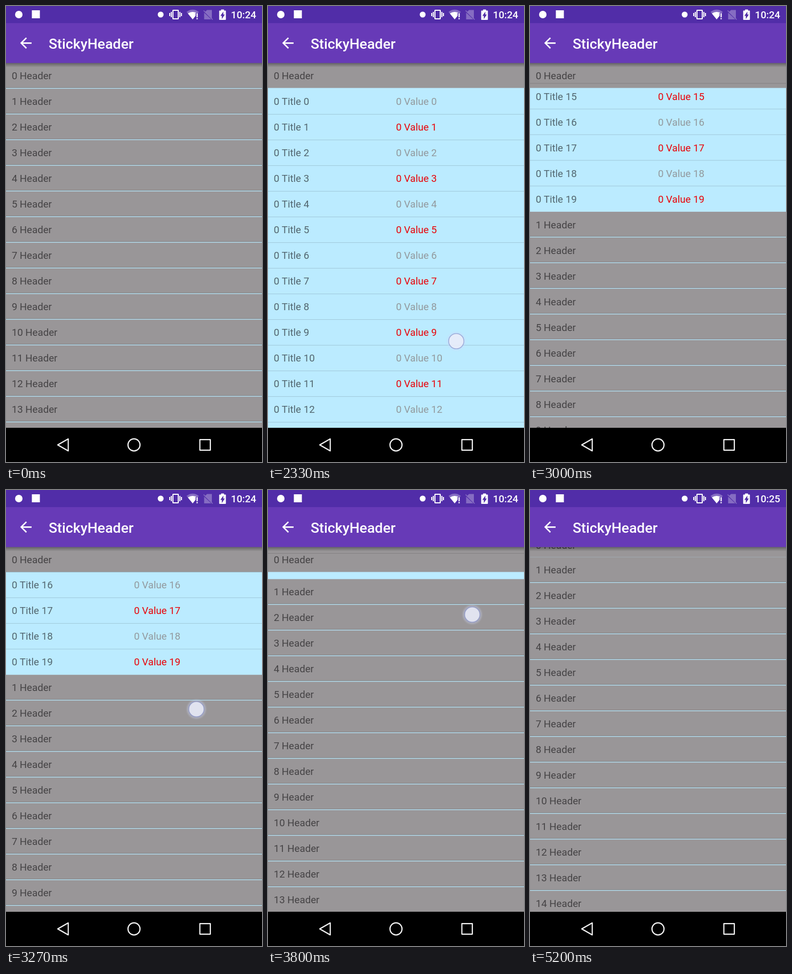
Write an HTML page with a canvas that moves like this. It is 480x853 px and loops after 5270 ms.

```html
<!DOCTYPE html>
<html lang="en">
<head>
<meta charset="utf-8">
<title>StickyHeader</title>
<style>
html, body { margin: 0; width: 100%; height: 100%; overflow: hidden; background: #000; }
canvas { display: block; width: 100vw; height: 100vh; }
</style>
</head>
<body>
<canvas id="stage" width="480" height="853"></canvas>
<script>
const ctx = document.getElementById('stage').getContext('2d');
const LOOP = 5270, STEP = 200 / 3;
// One dp is 4/3 px, so edges fall between pixels
const TOP = 106.67, ROW = 48, HEADER_H = 46.67, BASELINE = 30.7;
const CHILDREN = 20, NAV_Y = 789;
const BLUE = '#bbebff', GRAY = '#999698', PURPLE = '#673ab7', STATUS = '#512da8';

// Scroll keys: time, position, speed in px/ms
const KEYS = [
  [2333, 0, 0], [2667, 446.4, 1.45], [3267, 769, 0], [3800, 948, 0.18], [4400, 989, 0]
];

const clamp = (v, lo = 0, hi = 1) => Math.min(hi, Math.max(lo, v));
const ramp = (t, a, b) => clamp((t - a) / (b - a));

function scrollAt(t) {
  if (t <= KEYS[0][0]) return 0;
  for (let i = 1; i < KEYS.length; i++) {
    const [t0, p0, v0] = KEYS[i - 1], [t1, p1, v1] = KEYS[i];
    if (t > t1) continue;
    const h = t1 - t0, u = (t - t0) / h, w = 1 - u;
    return w * w * (1 + 2 * u) * p0 + u * u * (3 - 2 * u) * p1
      + h * u * w * (w * v0 - u * v1);
  }
  return KEYS[KEYS.length - 1][1];
}

function rect(x, y, w, h, color) {
  ctx.fillStyle = color;
  ctx.fillRect(x, y, w, h);
}

function text(str, x, y, color, font = '18.67px Roboto, sans-serif') {
  ctx.font = font;
  ctx.fillStyle = color;
  ctx.fillText(str, x, y);
}

function shape(d, color, x = 0, y = 0, scale = 1) {
  ctx.save();
  ctx.translate(x, y);
  ctx.scale(scale, scale);
  ctx.fillStyle = color;
  ctx.fill(new Path2D(d));
  ctx.restore();
}

function dot(x, y, r, color) {
  ctx.beginPath();
  ctx.arc(x, y, r, 0, Math.PI * 2);
  ctx.fillStyle = color;
  ctx.fill();
}

function header(n, y) {
  rect(0, y, 480, HEADER_H, GRAY);
  text(n + ' Header', 10.7, y + BASELINE, '#454345');
}

function child(n, y, alpha) {
  ctx.globalAlpha = alpha;
  text('0 Title ' + n, 10.7, y + BASELINE, '#52666f');
  text('0 Value ' + n, 240, y + BASELINE, n % 2 ? '#e90309' : '#92999d');
  ctx.globalAlpha = 1;
}

function list(t) {
  const open = t >= 790, scroll = scrollAt(t);
  const fade = ramp(t, 1070, 1267);
  const rowY = i => TOP + i * ROW - scroll;
  const visible = y => y > TOP - ROW && y < NAV_Y;
  const count = open ? CHILDREN : 0;

  ctx.save();
  ctx.beginPath();
  ctx.rect(0, 106, 480, NAV_Y - 106);
  ctx.clip();
  rect(0, 106, 480, NAV_Y - 106, BLUE);
  for (let i = 0; i < count; i++) {
    if (visible(rowY(i + 1))) child(i, rowY(i + 1), fade);
  }
  for (let n = open ? 1 : 0; n < 16; n++) {
    const y = rowY(count + n);
    if (!visible(y)) continue;
    header(n, y);
    rect(0, y + HEADER_H - 0.9, 480, 0.9, 'rgba(0,0,0,.2)');
  }
  if (open) header(0, Math.min(TOP, rowY(count + 1) - HEADER_H));
  // Row dividers lie above the sticky header
  for (let i = 0; i < count - 1; i++) {
    rect(0, rowY(i + 1) + 47.4, 480, 1, 'rgba(0,0,0,.15)');
  }
  ctx.restore();
}

function touch(x, y, alpha) {
  if (alpha <= 0) return;
  ctx.save();
  ctx.globalAlpha = alpha;
  const glow = ctx.createRadialGradient(x, y, 13, x, y, 20);
  glow.addColorStop(0, 'rgba(205,215,250,.55)');
  glow.addColorStop(1, 'rgba(205,215,250,0)');
  dot(x, y, 20, glow);
  dot(x, y, 14, 'rgba(238,240,248,.77)');
  ctx.lineWidth = 1.5;
  ctx.strokeStyle = 'rgba(125,135,195,.6)';
  ctx.beginPath();
  ctx.arc(x, y, 14.3, 0, Math.PI * 2);
  ctx.stroke();
  ctx.restore();
}

function touches(t) {
  const s = scrollAt(t);
  if (t >= 660 && t < 1000) touch(363, 144, 1 - ramp(t, 870, 1000));
  if (t >= 2330 && t < 2740) {
    const d = Math.min(386, s);
    touch(353 + 43 * d / 386, 627 - d, 1 - ramp(t, 2590, 2730));
  }
  if (t >= 3190 && t < 3970) {
    const d = clamp(s - 769, 0, 188);
    touch(357 + 26 * d / 179, 410 - d * 177 / 179, 1 - ramp(t, 3850, 3965));
  }
}

function statusBar(t) {
  const white = '#fff', dim = 'rgba(255,255,255,.3)';
  rect(0, 0, 480, 32, STATUS);
  dot(24, 16, 7, white);
  rect(48.5, 8, 15, 15, white);
  dot(290, 16, 5.5, white);
  // vibrate
  shape('M0 15h2V9H0zM3 17h2V7H3zM22 9v6h2V9zM19 17h2V7h-2zM16.5 3h-9C6.7 3 6 3.7 6 4.5v15c0 .8.7 1.5 1.5 1.5h9c.8 0 1.5-.7 1.5-1.5v-15c0-.8-.7-1.5-1.5-1.5zM16 19H8V5h8z', white, 306, 4);
  // wifi with a warning
  shape('M350 25L338.5 11Q350 2.5 361.5 11z', dim);
  shape('M350 25L341 14Q350 8 359 14z', white);
  rect(355.5, 13, 6, 13, STATUS);
  rect(357.2, 13.5, 2.3, 7.5, white);
  rect(357.2, 22.5, 2.3, 2.3, white);
  // no sim
  shape('M377 7.5H386V23L373.5 10.8zM371.5 12.5L385 25H371.5z', dim);
  ctx.lineWidth = 1.6;
  ctx.strokeStyle = dim;
  ctx.beginPath();
  ctx.moveTo(370.5, 8.5);
  ctx.lineTo(387.5, 25.5);
  ctx.stroke();
  // battery
  shape('M403.3 6.5h5.4v2h2.6q1 0 1 1v15.5q0 1-1 1h-10.6q-1 0-1-1v-15.5q0-1 1-1h2.6z', white);
  shape('M407.5 10.5v5.4h2.7l-5.5 8.5v-6h-2.8z', STATUS);
  text(t >= 5190 ? '10:25' : '10:24', 421.8, 23, white, '500 18.67px Roboto, sans-serif');
}

function toolbar() {
  const shade = ctx.createLinearGradient(0, TOP, 0, TOP + 8);
  shade.addColorStop(0, 'rgba(0,0,0,.34)');
  shade.addColorStop(1, 'rgba(0,0,0,0)');
  rect(0, 106, 480, 1, GRAY);
  rect(0, 106, 480, 9, shade);
  rect(0, 32, 480, TOP - 32, PURPLE);
  shape('M20 11H7.83l5.59-5.59L12 4l-8 8 8 8 1.41-1.41L7.83 13H20z', '#fff', 21.3, 53.3, 4 / 3);
  text('StickyHeader', 80, 79.8, '#fff', '500 26.67px Roboto, sans-serif');
}

function navBar() {
  rect(0, NAV_Y, 480, 853 - NAV_Y, '#000');
  ctx.lineWidth = 2.2;
  ctx.lineJoin = 'round';
  ctx.strokeStyle = '#f2f2f2';
  ctx.stroke(new Path2D('M97 821L116.7 809.8V832.2z'));
  ctx.beginPath();
  ctx.arc(240, 821, 11.3, 0, Math.PI * 2);
  ctx.stroke();
  ctx.strokeRect(363.5, 811.2, 19.6, 19.6);
}

function draw(now) {
  // The screen updates fifteen times a second
  const t = Math.min(78, Math.floor((now % LOOP + 4) / STEP)) * STEP;
  list(t);
  statusBar(t);
  toolbar();
  navBar();
  touches(t);
}

const start = performance.now();
function tick() {
  draw(performance.now() - start);
  requestAnimationFrame(tick);
}
tick();
</script>
</body>
</html>
```
